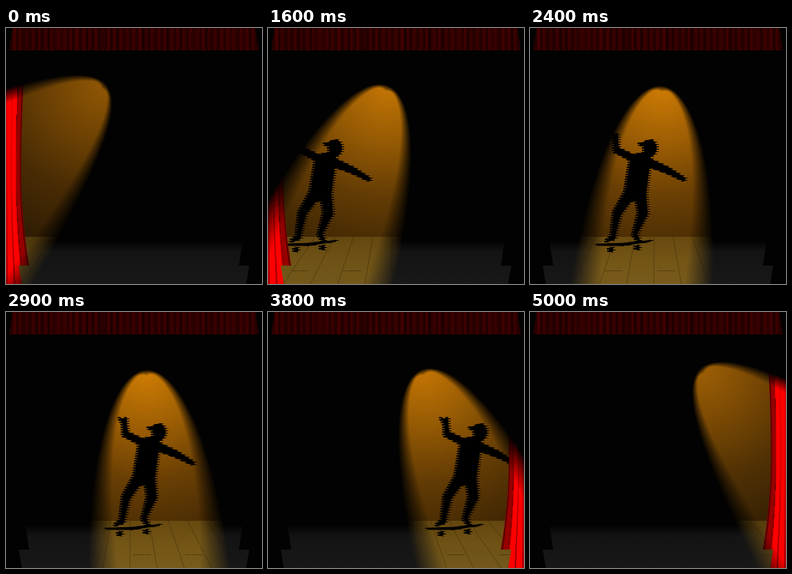
An HTML page with a canvas for the animation above (5100 ms loop, 320x320 px).

```html
<!DOCTYPE html>
<html lang="en">
<head>
<meta charset="utf-8">
<title>Skater in the spotlight</title>
<style>
html, body { margin: 0; width: 100%; height: 100%; overflow: hidden; background: #000; }
canvas { display: block; width: 100vw; height: 100vh; }
</style>
</head>
<body>
<canvas id="stage" width="320" height="320"></canvas>
<script>
const SIZE = 320, LOOP = 5100, STEP = 100;
const FLOOR_Y = 261, HEM_Y = 297;
const SPEED = 8.25;

function layer(paint) {
  const c = document.createElement('canvas');
  c.width = c.height = SIZE;
  const g = c.getContext('2d');
  if (paint) paint(g);
  return { c, g };
}

function ramp(grad, ...colors) {
  colors.forEach((color, i) => grad.addColorStop(i / (colors.length - 1), color));
  return grad;
}

function random(seed) {
  return () => (seed = seed * 16807 % 2147483647) / 2147483647;
}

// Inner edge of the left curtain: narrow at the waist, flared at the hem
function curtainEdge(y) {
  if (y >= HEM_Y) return 16 + (y - HEM_Y) * .17;
  const d = y - 180;
  return 19 + (d < 0 ? 3 : 9) * (d / 110) ** 2;
}

function curtain(g) {
  for (let y = 50; y < SIZE; y++) {
    const edge = curtainEdge(y), drape = curtainEdge(Math.min(y, HEM_Y - 1)) + Math.max(0, y - HEM_Y) * .12;
    for (let x = 0; x < edge; x++) {
      const u = x / drape;
      const fold = Math.max(0, Math.sin(u * 21 + 1)) ** 4;
      const red = u < .64 ? 255 - fold * 110 * y / SIZE : 150 - fold * 80;
      g.fillStyle = `rgb(${Math.round(red)},0,0)`;
      g.fillRect(x, y, Math.min(1, edge - x), 1);
    }
  }
}

function mirror(g) {
  g.translate(SIZE, 0);
  g.scale(-1, 1);
}

const curtains = layer(g => {
  curtain(g);
  mirror(g);
  curtain(g);
});

// Parts that stay visible without the spotlight
const dimSet = layer(g => {
  const black = '#020202';
  g.fillStyle = black;
  g.fillRect(0, 0, SIZE, SIZE);
  g.fillStyle = ramp(g.createLinearGradient(0, 266, 0, SIZE), black, '#131313', '#151515', '#161616', '#181818');
  for (let y = 266; y < SIZE; y++) {
    const edge = curtainEdge(y);
    g.fillRect(edge, y, SIZE - 2 * edge, 1);
  }

  const rnd = random(77);
  g.beginPath();
  g.moveTo(8, 0);
  g.lineTo(312, 0);
  g.lineTo(316, 28);
  g.lineTo(4, 28);
  g.clip();
  for (let x = 0; x < SIZE; x++) {
    const fold = .5 + .25 * Math.sin(x * .8) + .5 * (rnd() - .5);
    g.fillStyle = `rgb(${Math.round(22 + 48 * fold)},0,0)`;
    g.fillRect(x, 0, 1, 28);
  }
});

const litFloor = layer(g => {
  g.fillStyle = ramp(g.createLinearGradient(0, FLOOR_Y, 0, SIZE), '#684a10', '#735516', '#785b1c');
  g.fillRect(0, FLOOR_Y, SIZE, SIZE - FLOOR_Y);
  g.strokeStyle = 'rgba(50,35,5,.4)';
  g.beginPath();
  for (let k = -7; k <= 7; k++) {
    g.moveTo(155 + k * 24, FLOOR_Y);
    g.lineTo(155 + k * 34, SIZE);
    g.moveTo(159 + k * 65, 303.5);
    g.lineTo(181 + k * 65, 303.5);
  }
  g.stroke();
});

const figure = layer(g => {
  const dot = (x, y, rx, ry = rx) => {
    g.beginPath();
    g.ellipse(x, y, rx, ry, 0, 0, 7);
    g.fill();
  };
  // Tapered bar between two round ends
  const limb = (x0, y0, r0, x1, y1, r1) => {
    const a = Math.atan2(y1 - y0, x1 - x0), sx = -Math.sin(a), sy = Math.cos(a);
    dot(x0, y0, r0);
    dot(x1, y1, r1);
    g.beginPath();
    g.moveTo(x0 + sx * r0, y0 + sy * r0);
    g.lineTo(x1 + sx * r1, y1 + sy * r1);
    g.lineTo(x1 - sx * r1, y1 - sy * r1);
    g.lineTo(x0 - sx * r0, y0 - sy * r0);
    g.fill();
  };
  // head and cap
  dot(150, 150, 9.5, 11);
  limb(137, 145, 2, 147, 146, 5);
  limb(148, 155, 6, 142, 166, 8);
  // torso
  limb(137, 170, 14, 132, 203, 14.5);
  limb(125, 161, 4, 148, 166, 5);
  // raised arm
  limb(125, 161, 5, 109, 153, 4.5);
  limb(108, 153, 4.5, 107, 140, 4);
  limb(106, 138, 4, 101, 133, 2);
  limb(107, 138, 4, 109, 133, 2);
  // stretched arm
  limb(148, 168, 6, 172, 178, 4.5);
  limb(172, 178, 4.5, 192, 189, 3);
  // legs
  limb(125, 206, 8, 109, 231, 6);
  limb(109, 231, 6, 104, 258, 4);
  limb(104, 261, 4, 96, 266, 2.5);
  limb(138, 206, 8, 141, 231, 7);
  limb(141, 231, 7, 132, 255, 4);
  limb(131, 258, 4, 135, 265, 3);
  // board
  limb(83, 271, 1.3, 117, 270.5, 2);
  limb(117, 270.5, 2, 151, 266, 1.3);
  dot(101, 277, 4, 3.5);
  dot(134, 274.5, 4, 3.5);
});

// Alternate rows are pushed apart for the combed outline
const skater = layer(g => {
  for (let y = 125; y < 285; y += 3) {
    g.drawImage(figure.c, 0, y, SIZE, 2, -1, y, SIZE, 2);
    g.drawImage(figure.c, 0, y + 2, SIZE, 1, 2, y + 2, SIZE, 1);
  }
});

function beamAt(i) {
  const deg = (i - 26) * 1.9, rad = deg * Math.PI / 180;
  return {
    deg, rad,
    x: 171 + 61 * Math.sin(rad),
    y: 12 + .0079 * deg * deg + 61 * Math.cos(rad),
    spread: .00007 * deg * deg - .09
  };
}

// Nested conic outlines add up to an edge that softens with distance
function paintMask(g, beam) {
  const rings = 20, points = 40, reach = 480;
  g.setTransform(1, 0, 0, 1, 0, 0);
  g.clearRect(0, 0, SIZE, SIZE);
  g.translate(beam.x, beam.y);
  g.rotate(-beam.rad);
  g.globalCompositeOperation = 'lighter';
  g.fillStyle = `rgba(255,255,255,${1 / rings})`;
  for (let r = 0; r < rings; r++) {
    const inset = (r + .5) / rings * 2 - .2;
    g.beginPath();
    for (let n = -points; n <= points; n++) {
      const d = reach * (n / points) ** 2;
      const w = Math.sqrt(Math.max(0, 51 * d + beam.spread * d * d));
      const near = Math.min(1, w / 20);
      const half = Math.max(0, w - inset * (4 + .06 * d) * near);
      g.lineTo(Math.sign(n) * half, d + 4 * inset * (1 - near));
    }
    g.fill();
  }
  g.globalCompositeOperation = 'source-over';
}

const out = document.getElementById('stage').getContext('2d');
const mask = layer(), lit = layer();

function draw(i) {
  const beam = beamAt(i), g = lit.g;
  const dim = 1 - .3 * (beam.deg / 49) ** 2;
  const tone = level => `rgb(${Math.round(level * dim)},${Math.round(level * dim * .6)},4)`;

  paintMask(mask.g, beam);

  g.globalCompositeOperation = 'source-over';
  g.fillStyle = ramp(g.createRadialGradient(beam.x, beam.y, 0, beam.x, beam.y, 280),
    ...[208, 158, 104, 70, 56].map(tone));
  g.fillRect(0, 0, SIZE, SIZE);
  g.drawImage(litFloor.c, 0, 0);
  g.fillStyle = `rgba(0,0,0,${(1 - dim) * .7})`;
  g.fillRect(0, FLOOR_Y, SIZE, SIZE - FLOOR_Y);
  g.drawImage(skater.c, (i - 23) * SPEED, 0);
  g.drawImage(curtains.c, 0, 0);
  g.globalCompositeOperation = 'destination-in';
  g.drawImage(mask.c, 0, 0);

  out.drawImage(dimSet.c, 0, 0);
  out.drawImage(lit.c, 0, 0);
}

const start = performance.now();
let shown = -1;

function tick() {
  const t = (performance.now() - start) % LOOP;
  const i = Math.max(0, Math.floor(t / STEP) - 1);
  if (i !== shown) draw(shown = i);
  requestAnimationFrame(tick);
}
tick();
</script>
</body>
</html>
```
